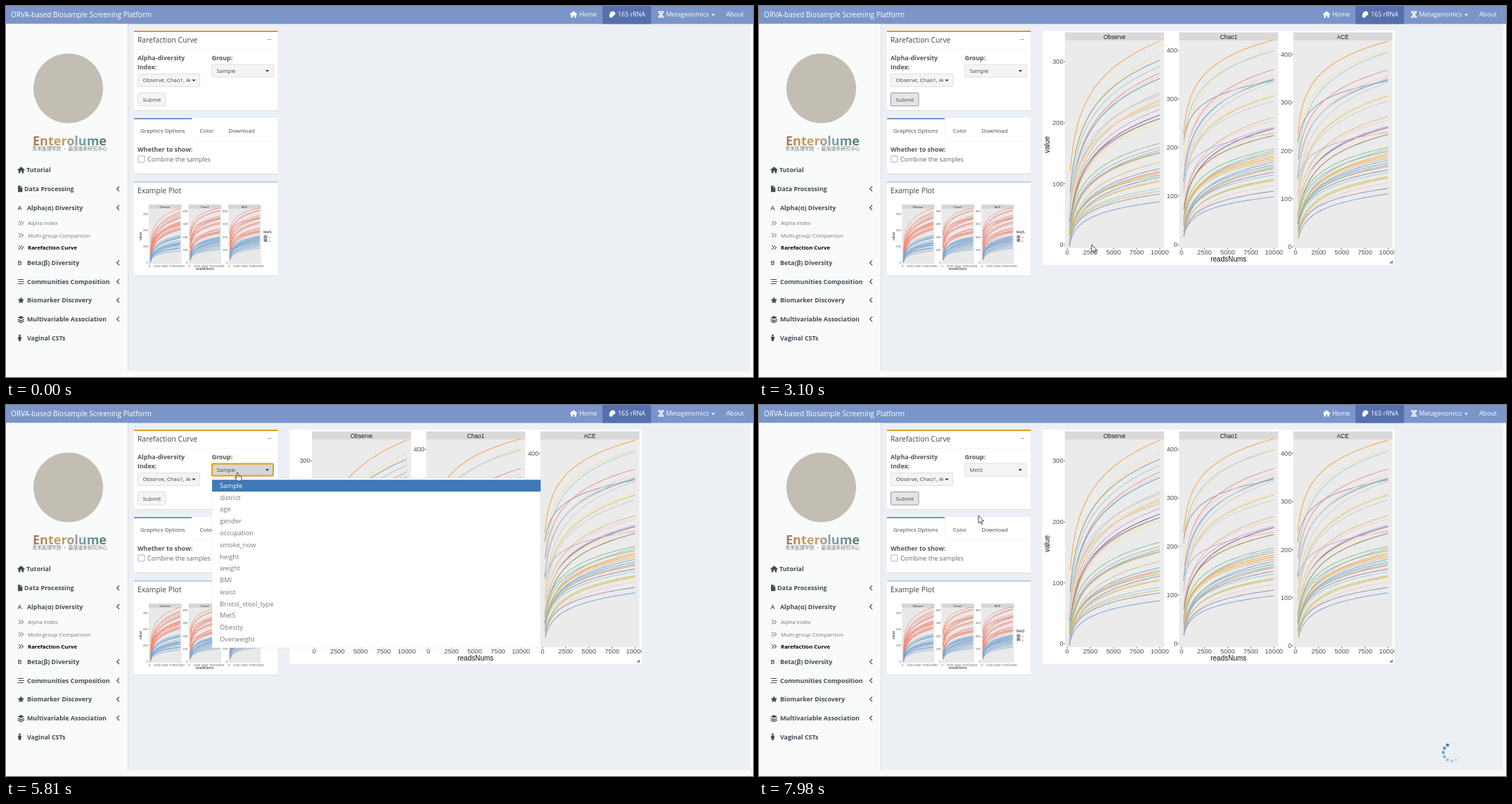
These frames come from a looping animation (1062 px wide and 527 px high, 8000 ms). An HTML page:

```html
<!DOCTYPE html>
<html lang="en">
<head>
<meta charset="utf-8">
<title>Rarefaction Curve</title>
<style>
html, body { margin: 0; width: 100%; height: 100%; overflow: hidden; background: #ecf0f5; }
svg { display: block; width: 100%; height: 100%; }
text { font-family: "Open Sans", "Noto Sans", sans-serif; white-space: pre; }
.plot text { font-family: "Liberation Sans", Arial, sans-serif; }
.cjk { font-family: "Noto Sans CJK SC", "Noto Sans CJK", sans-serif; }
</style>
</head>
<body>
<svg id="stage" viewBox="0 0 1062 527" xmlns="http://www.w3.org/2000/svg"></svg>
<script>
const LOOP = 8000;
const stage = document.getElementById('stage');

function el(tag, attrs, parent = stage) {
  const node = document.createElementNS('http://www.w3.org/2000/svg', tag);
  for (const key in attrs) node.setAttribute(key, attrs[key]);
  parent.appendChild(node);
  return node;
}
const set = (node, attrs) => { for (const key in attrs) node.setAttribute(key, attrs[key]); };
const show = (node, on) => node.setAttribute('visibility', on ? 'visible' : 'hidden');
const group = (parent = stage, attrs = {}) => el('g', attrs, parent);
const rect = (x, y, width, height, fill, parent = stage, more = {}) =>
  el('rect', { x, y, width, height, fill, ...more }, parent);
const path = (d, attrs, parent = stage) => el('path', { d, fill: 'none', ...attrs }, parent);
function label(x, y, str, size, fill, parent = stage, more = {}) {
  const node = el('text', { x, y, 'font-size': size, fill, ...more }, parent);
  node.textContent = str;
  return node;
}
const BOLD = { 'font-weight': 700 };
const MID = { 'text-anchor': 'middle' };
const END = { 'text-anchor': 'end' };

function seeded(seed) {
  return () => (seed = (seed * 16807) % 2147483647) / 2147483647;
}

// Clip areas
const defs = el('defs', {});
function clip(id, x, y, w, h) {
  rect(x, y, w, h, '#000', el('clipPath', { id }, defs));
  return { 'clip-path': `url(#${id})` };
}

// Small icons
const caret = (x, y, fill, parent) => path(`M${x - 2.6} ${y - 1.3}h5.2l-2.6 2.7z`, { fill }, parent);
const house = (x, y, fill) =>
  path(`M${x} ${y - 4.8}l5.4 4.6-.8.9-.9-.7v4.4h-2.6v-3h-2.2v3h-2.6V${y}l-.9.7-.8-.9z`, { fill });
const chevron = (x, y) =>
  path(`M${x + 1.7} ${y - 3.4}l-3.4 3.4 3.4 3.4`, { stroke: '#444', 'stroke-width': 1.2 });
const angles = (x, y, stroke) =>
  path(`M${x - 3} ${y - 3}l3 3-3 3M${x + .6} ${y - 3}l3 3-3 3`, { stroke, 'stroke-width': 1 });

function drawNavbar() {
  rect(0, 0, 1062, 25.5, '#7b95c8');
  rect(848, 0, 69, 25.5, '#5570ad');
  label(7, 15.6, 'ORVA-based Biosample Screening Platform', 10, '#fff');
  house(807, 12, '#fff');
  label(815, 15.2, 'Home', 8.9, '#fff');
  path('M858 16c-1-4 1-8 4-8.500c3-.5 5 2 4 4.500c-.8 1.800-2.500 1-3 2.500c-.4 1.500-3 3-5 1.500z', { fill: '#fff' });
  label(870, 15.2, '16S rRNA', 8.9, '#fff');
  path('M928 7.500c0 5 6.500 4 6.500 9M934.500 7.500c0 5-6.500 4-6.500 9M927 8.200h8.500M929 10h4.500M929 14h4.500M927 15.900h8.500',
    { stroke: '#fff', 'stroke-width': 1.2 });
  label(938.5, 15.2, 'Metagenomics', 8.9, '#fff');
  caret(1005.5, 12.8, '#fff');
  label(1024, 15.2, 'About', 8.9, '#fff');
}

function drawSidebar() {
  const ink = '#444b52';
  rect(0, 25.5, 173, 502, '#f9fbfb');
  rect(173, 25.5, .8, 493, '#d2d6de');
  el('circle', { cx: 88.5, cy: 117, r: 49.5, fill: '#c3beb3' });
  const fade = el('linearGradient', { id: 'word' }, defs);
  ['#a8755f', '#d2a15f', '#7d9db0', '#4f7f74'].forEach((c, i) =>
    el('stop', { offset: i / 3, 'stop-color': c }, fade));
  label(90.5, 197.5, 'Enterolume', 18, 'url(#word)', stage, { ...BOLD, ...MID });
  label(90.5, 205, '青禾医理学院 · 菌落谱系研究中心', 6.9, '#777', stage, { ...MID, class: 'cjk' });

  const items = [
    [29, 233, 'Tutorial'], [26, 259.7, 'Data Processing', 1], [30, 286.4, 'Alpha(α) Diversity', 1],
    [30, 364.7, 'Beta(β) Diversity', 1], [30, 391.4, 'Communities Composition', 1],
    [30, 418, 'Biomarker Discovery', 1], [30, 444.7, 'Multivariable Association', 1], [30, 471.4, 'Vaginal CSTs']
  ];
  for (const [x, y, name, open] of items) {
    label(x, y + 3.2, name, 8.9, ink, stage, BOLD);
    if (open) chevron(159.300, y);
  }
  ['Alpha index', 'Multi-group Comparison', 'Rarefaction Curve'].forEach((name, i) => {
    const y = 308.3 + i * 17.4, on = i === 2;
    angles(21, y, on ? '#111' : '#555');
    label(31, y + 2.9, name, 7.8, on ? '#000' : '#777', stage, on ? BOLD : {});
  });
  house(21.500, 233, ink);
  path('M17 255.300h3.500v3h2.800v6h-6.300zM21.100 255.300l2.200 2.300h-2.200z', { fill: ink });
  label(16.500, 289.8, 'A', 9, ink, stage, { 'font-weight': 600 });
  label(16.500, 368.1, 'B', 9, ink, stage, { 'font-weight': 600 });
  path('M16.500 388.500h8.500M18 391.500h8M16.500 394.500h8.500', { stroke: ink, 'stroke-width': 1.2 });
  let star = '';
  for (let i = 0; i < 10; i++) {
    const a = i * Math.PI / 5 - Math.PI / 2, r = i % 2 ? 2.4 : 5;
    star += `${i ? 'L' : 'M'}${21.300 + r * Math.cos(a)} ${418.3 + r * Math.sin(a)}`;
  }
  path(star + 'z', { fill: ink });
  path('M16.500 442.500l4.700-2.300 4.700 2.300-4.700 2.300z', { fill: ink });
  path('M16.500 445l4.700 2.200 4.700-2.200M16.500 447.500l4.700 2.200 4.700-2.200', { stroke: ink, 'stroke-width': 1.3 });
  path('M17.500 469.500h4l.8 3.500h-1.200v3h-3.200v-3h-1.200z', { fill: ink });
  el('circle', { cx: 19.500, cy: 467.800, r: 1.4, fill: ink });
}

function box(y, h, line) {
  rect(182, y + .8, 204.500, h, '#000', stage, { opacity: .1 });
  rect(182, y, 204.500, h, '#fff');
  if (line) rect(182, y, 204.500, 2, line);
}

function button(x, y, w, h) {
  return rect(x + .5, y + .5, w - 1, h - 1, '#f4f4f4', stage, { rx: 1.5, stroke: '#ddd', 'stroke-width': .9 });
}

// Rarefaction curves: colour key, end height in the first and in the second panel
const COLORS = {
  o: '#f2ad58', y: '#fbe2a6', t: '#a3d4d2', g: '#a0a3a5', r: '#ea9d99', p: '#f3cfcd', b: '#64aad2',
  w: '#d3d1d3', k: '#d3c88f', u: '#8d6f9e', l: '#c9b3d3', n: '#8fcb9c', d: '#a98d72', s: '#8eaed6',
  e: '#cfc24b', v: '#a39bb4'
};
const CURVES = ('o50/48 y69/61 t86/64 g77/106 r95/90 p99/98 b103/104 w123/108 w127/102 y131/126 k134/128 ' +
  'w125/135 k140/158 p137/163 l147/172 u155/174 l160/181 y165/178 d160/184 n195/203 l201/206 n205/209 ' +
  's208/222 o209/213 k222/219 s231/226 r235/231 o237/216 n240/229 e249/246 t259/240 v243/236 p247/255 ' +
  'k263/248 v267/263 s278/271').split(' ').map(c => {
  const [first, second] = c.slice(1).split('/').map(Number);
  return { key: c[0], first: 339 - first, second: 339 - second };
});

function drawCurves(parent, panel, x0, y0, width, scale, width1, colorOf) {
  const rand = seeded(91 + panel);
  CURVES.forEach((c, i) => {
    const h = panel === 0 ? c.first : panel === 1 ? c.second : c.second * .972 + 9;
    let k = (panel ? .1 + .09 * (1 - h / 290) : .145 + .055 * (1 - h / 290)) + (rand() - .5) * .03;
    if (panel && c.key === 'g') k = .069;
    if (panel && i === 16) k = .08;
    k = Math.min(k, .195);
    const start = .022 + rand() * .012;
    let d = '';
    for (let j = 0; j <= 36; j++) {
      const u = start + (1 - start) * (j / 36) ** 2;
      const y = y0 - scale * Math.max(-3, h * (1 + k * Math.log2(u)));
      d += `${j ? 'L' : 'M'}${(x0 + u * width).toFixed(2)} ${y.toFixed(2)}`;
    }
    path(d, { stroke: colorOf(c, i), 'stroke-width': width1 }, parent);
  });
}

const NAMES = ['Observe', 'Chao1', 'ACE'];

function drawExample() {
  const g = group(stage, { class: 'plot' });
  NAMES.forEach((name, i) => {
    const x = 203 + i * 56.5, top = i ? 400 : 300, step = i ? 18.2 : 23;
    rect(x, 282, 46.500, 6, '#d6d6d6', g);
    rect(x, 288, 46.500, 78.500, '#e9e9e9', g);
    label(x + 23, 286.600, name, 4, '#333', g, MID);
    drawCurves(g, i, x + 1.2, 364, 43.500, .265, .75, (c, n) => n < 19 ? '#f18877' : '#79a5cf');
    for (let v = 0; v <= top; v += 100) label(x - 1, 366 - v / 100 * step, v, 4.3, '#555', g, END);
    for (let v = 0; v <= 4; v++) label(x + 1 + v * 10.9, 370.500, v * 2500, 4.3, '#555', g, MID);
  });
  label(282.500, 375.300, 'readsNums', 5, '#222', g, MID);
  label(0, 0, 'value', 5, '#222', g, { ...MID, transform: 'translate(192.5 327) rotate(-90)' });
  label(366, 322.500, 'MetS', 5, '#222', g);
  ['#a98b8d', '#75909a'].forEach((c, i) => {
    rect(366.500, 325.500 + i * 5, 4.800, 4.600, c, g);
    label(373.500, 329.500 + i * 5, 'ny'[i], 4, '#444', g);
  });
}

function drawPlot() {
  const g = group(stage, { class: 'plot', ...clip('plotClip', 403, 35, 500.500, 333) });
  rect(403, 35, 501, 333, '#fff', g);
  NAMES.forEach((name, i) => {
    const x = 435 + i * 162.3, zero = i === 2 ? 342 : 339;
    const step = [86.6, 69, 68.3][i], top = i ? 4 : 3;
    rect(x, 37.500, 141, 11.700, '#d9d9d9', g);
    rect(x, 49.200, 141, 294.600, '#ebebeb', g);
    label(x + 70.5, 46.500, name, 8.3, '#1a1a1a', g, MID);
    drawCurves(g, i, x + 3.2, zero, 131.6, 1, 1.15, c => COLORS[c.key]);
    for (let v = 0; v <= top; v++) {
      const y = zero - v * step;
      label(x - 2.5, y + 3.2, v * 100, 9.2, '#4d4d4d', g, END);
      rect(x - 2, y - .4, 2, .8, '#444', g);
    }
    for (let v = 0; v <= 4; v++) {
      const tx = x + 3.2 + v * 32.9;
      rect(tx - .4, 343.800, .8, 2, '#444', g);
      label(tx, 353, v * 2500, 9.3, '#4d4d4d', g, MID);
    }
  });
  label(667.500, 363, 'readsNums', 10, '#111', g, MID);
  label(0, 0, 'value', 10, '#111', g, { ...MID, transform: 'translate(413 197) rotate(-90)' });
  path('M901 361.500v4h-5z', { fill: '#777' }, g);
  return g;
}

// Page
rect(0, 0, 1062, 527, '#f9fbfb');
rect(173, 25, 885, 493.500, '#ecf0f5');
drawNavbar();
drawSidebar();

box(35, 113, '#e59a1f');
label(187, 51.700, 'Rarefaction Curve', 10.3, '#444');
rect(371.500, 47, 5.500, .9, '#97a0b3');
rect(182, 61, 204.500, .7, '#f0f0f0');
label(187, 76.500, 'Alpha-diversity', 8.9, '#555', stage, BOLD);
label(187, 89.900, 'Index:', 8.9, '#555', stage, BOLD);
label(292.500, 76.500, 'Group:', 8.9, '#555', stage, BOLD);
button(187, 96, 89, 19);
label(194.500, 108.400, 'Observe, Chao1, ACE', 7.8, '#444', stage, clip('indexClip', 190, 97, 72, 17));
caret(267, 105.800, '#333');
const groupSelect = button(292, 82.500, 89, 19);
const groupLabel = label(299.500, 95, 'Sample', 7.8, '#444');
caret(371.500, 92.300, '#333');
const focusRing = rect(293, 83.500, 87, 17, 'none', stage, { rx: 1.5, stroke: '#e89c1c', 'stroke-width': 2 });
const submit = button(187, 123, 40.500, 19.500);
label(194.500, 135.700, 'Submit', 7.8, '#444');

box(159, 79);
rect(182, 159, 82, 2, '#6a9bd0');
rect(264, 190.800, 122.500, .7, '#f0f0f0');
rect(263.700, 161, .7, 30, '#f0f0f0');
label(191, 179.700, 'Graphics Options', 7.9, '#444');
label(275.500, 179.700, 'Color', 7.9, '#444');
label(316.500, 179.700, 'Download', 7.9, '#444');
label(187, 207.200, 'Whether to show:', 8.9, '#555', stage, BOLD);
rect(187.900, 212.900, 9, 9, '#fff', stage, { rx: 1.2, stroke: '#a5a5a5', 'stroke-width': .9 });
label(201, 220.700, 'Combine the samples', 8.9, '#666');

box(249, 134, '#c3cfe3');
label(187, 266.200, 'Example Plot', 10.3, '#444');
drawExample();
const plot = drawPlot();

// Drop-down list
const ROW = 16.78, MENU_TOP = 106.2;
const menu = group();
rect(292.500, 103.500, 468, 242, '#000', menu, { opacity: .07, rx: 2 });
rect(293, 104, 467, 240.800, '#fff', menu);
rect(293, MENU_TOP, 467, ROW, '#3f79b7', menu);
const hoverRow = rect(293, 0, 467, ROW, '#e1e2e6', menu);
const options = ['Sample', 'district', 'age', 'gender', 'occupation', 'smoke_now', 'height', 'weight', 'BMI',
  'waist', 'Bristol_stool_type', 'MetS', 'Obesity', 'Overweight'].map((name, i) =>
  label(304, MENU_TOP + i * ROW + 11.7, name, 9.3, i ? '#777' : '#fff', menu));

// Loading dots
const DOTS = 12;
const spinner = group();
const dots = Array.from({ length: DOTS }, (_, i) => {
  const a = i * 2 * Math.PI / DOTS;
  return el('circle', { cx: 985 + 12.2 * Math.cos(a), cy: 493.500 + 12.2 * Math.sin(a), r: 2.2, fill: '#3f7fb5' }, spinner);
});

// Pointer
const glow = el('circle', { r: 6.5, fill: '#f7d935', opacity: .85 });
const pointer = group();
const ink = { fill: '#fff', stroke: '#333', 'stroke-width': .9, 'stroke-linejoin': 'round' };
const arrow = path('M0 0V10.800l2.500-2.300 1.700 4 1.700-.7-1.700-3.900h3.500z', ink, pointer);
const hand = path('M-1 .8q1-1.500 2 0v4.200l3.800.9q1.300.4 1.200 1.900l-.9 4.300h-5.300l-3.600-4.400q.2-1.500 1.600-.7l1.200 1z', ink, pointer);

const linear = p => p;
const out = p => 1 - (1 - p) ** 3;
const smooth = p => p * p * (3 - 2 * p);
const KEYS = [
  [130, 1001, 509], [870, 210, 135, out], [1390, 210, 135], [1550, 282, 214, linear],
  [2300, 473, 339, out], [3100, 473, 339], [3320, 487, 362, smooth], [3540, 467, 397, linear],
  [3860, 407, 339, smooth], [3930, 407, 339], [4680, 329, 93, smooth], [5810, 329, 93],
  [6010, 333, 277, out], [6290, 330, 298, smooth], [6540, 330, 298], [6610, 326.500, 280.500, linear],
  [7240, 210, 135, smooth], [7640, 210, 135], [7980, 312, 157, smooth]
];

function pointerAt(t) {
  const i = KEYS.findIndex(k => k[0] > t);
  if (i < 0) return KEYS[KEYS.length - 1].slice(1, 3);
  if (i === 0) return KEYS[0].slice(1, 3);
  const [t0, x0, y0] = KEYS[i - 1], [t1, x1, y1, ease = linear] = KEYS[i];
  const p = ease((t - t0) / (t1 - t0));
  return [x0 + (x1 - x0) * p, y0 + (y1 - y0) * p];
}

const within = (t, a, b) => t >= a && t < b;
const inside = (x, y, l, t, r, b) => x >= l && x <= r && y >= t && y <= b;

function render(t) {
  const [x, y] = pointerAt(t);
  const open = within(t, 4955, 6545);
  const overSubmit = inside(x, y, 187, 123, 227, 142);
  const overSelect = inside(x, y, 292, 83, 381, 101);
  const submitFocus = within(t, 1010, 4815) || t >= 7385;
  const selectFocus = within(t, 4815, 7385);

  set(submit, {
    fill: submitFocus || overSubmit ? '#e5e5e5' : '#f4f4f4',
    stroke: submitFocus ? '#8c8c8c' : overSubmit ? '#adadad' : '#ddd'
  });
  set(groupSelect, { fill: overSelect || open ? '#d6d6d6' : selectFocus ? '#ebebeb' : '#f4f4f4' });
  show(focusRing, selectFocus);
  groupLabel.textContent = t < 6545 ? 'Sample' : 'MetS';
  show(plot, t >= 2300);

  show(menu, open);
  const row = Math.floor((pointerAt(t - 70)[1] - MENU_TOP) / ROW);
  const hovering = open && row > 0 && row < options.length;
  show(hoverRow, hovering);
  if (hovering) set(hoverRow, { y: MENU_TOP + row * ROW });
  options.forEach((o, i) => i && set(o, { fill: hovering && i === row ? '#444' : '#777' }));

  const second = t >= 7450;
  show(spinner, within(t, 1410, 2300) || second);
  const lead = second ? 240 + (t - 7980) * .3 : 180 + (t - 1550) * .3;
  dots.forEach((dot, i) => {
    const age = (((lead - i * 360 / DOTS) % 360 + 360) % 360) / .3;
    set(dot, { opacity: Math.max(0, 1 - age / 720) });
  });

  const onHand = overSubmit || overSelect || (open && y > MENU_TOP);
  show(arrow, t >= 130 && !onHand);
  show(hand, t >= 130 && onHand);
  set(pointer, { transform: `translate(${x} ${y})` });
  show(glow, [1010, 4820, 6470, 7385].some(c => within(t, c, c + 130)));
  set(glow, { cx: x, cy: y + 2 });
}

function tick() {
  render(performance.now() % LOOP);
  requestAnimationFrame(tick);
}
tick();
</script>
</body>
</html>
```
